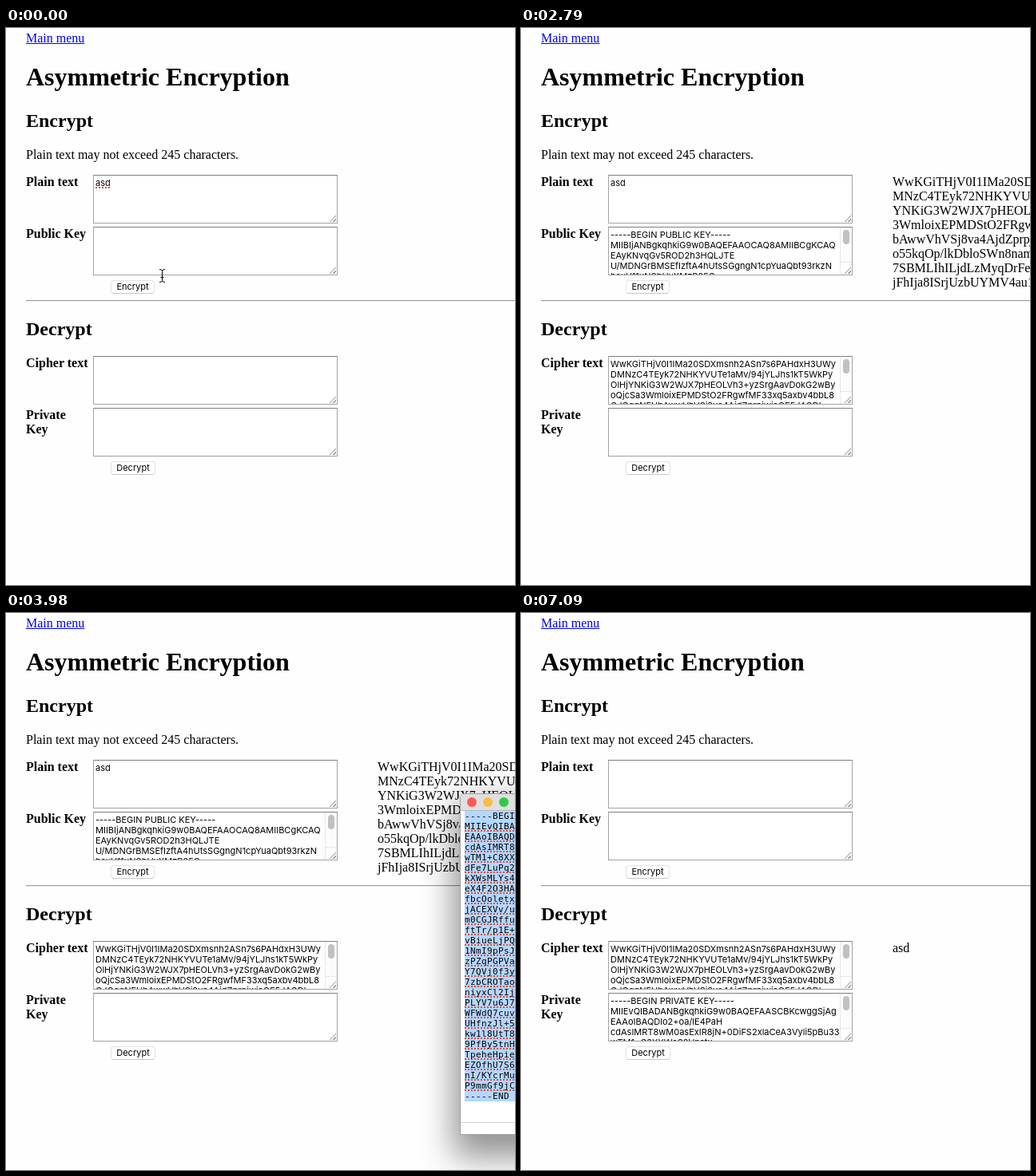
An HTML page for the animation above (7990 ms loop, 637x698 px).

```html
<!DOCTYPE html>
<html lang="en">
<head>
<meta charset="utf-8">
<title>Asymmetric Encryption</title>
<style>
html, body { margin: 0; width: 100%; height: 100%; overflow: hidden; background: #fefefe; }
#stage { position: relative; width: 637px; height: 698px; overflow: hidden; color: #000; font: 16px/18px "Liberation Serif", serif; }
#stage * { box-sizing: border-box; }
#stage > *, .field > *, .icon, .window > * { position: absolute; margin: 0; white-space: pre; }
[hidden] { display: none !important; }
#stage > h1, #stage > h2, #stage > p, #stage > b, #stage > a { left: 25px; }
h1 { font-size: 32px; line-height: 36px; }
h2 { font-size: 24px; line-height: 27px; }
a { color: #00e; text-decoration: underline; }
hr { left: 25px; top: 341px; width: 700px; height: 2px; border: 0; border-top: 1px solid #9a9a9a; border-bottom: 1px solid #eee; }
pre { font: inherit; }
.out { left: 465px; }

.field { left: 109px; width: 306px; height: 61px; border: 1px solid #a3a3a3; border-top-color: #7f7f7f; background: #fff; font: 11px/13px Inter, sans-serif; }
.field pre { left: 0; top: 0; width: 100%; height: 59px; padding: 3px 2px 0; overflow: hidden; }
.field pre.end { padding-top: 6px; }
.field pre.end span { position: relative; top: -13px; }
.field::after { content: ""; position: absolute; right: 1px; bottom: 1px; width: 8px; height: 8px;
  background: linear-gradient(135deg, #0000 49%, #909090 49% 56%, #0000 56% 75%, #909090 75% 82%, #0000 82%); }
.ring { inset: -2px; border: 2px solid #5b9fe8; border-radius: 2px; box-shadow: 0 0 1px 1px #a9cff6; }
.bar { right: 0; top: 0; width: 15px; height: 59px; border-left: 1px solid #e6e6e6; background: #fcfcfc; }
.bar::before { content: ""; position: absolute; left: 3px; top: 3px; width: 8px; height: 18px; border-radius: 4px; background: #c1c1c1; }
.bar.low::before { top: 27px; }
.bar::after { content: ""; position: absolute; left: 0; bottom: 0; width: 14px; height: 15px; border-top: 1px solid #e6e6e6; background: #fff; }
.caret { width: 1px; height: 13px; background: #000; }
.misspelt { text-decoration: underline dotted #e8453c 2px; text-underline-offset: 1px; text-decoration-skip-ink: none; }
.button { left: 131px; width: 55px; height: 17px; border: 1px solid #e2e2e2; border-bottom-color: #c8c8c8; border-radius: 4px; background: #fff; font: 11px/15px Inter, sans-serif; text-align: center; }
.button.down { border-color: #2f7de0; background: #4a95f2; color: #fff; }

.window { left: 568px; top: 226px; width: 500px; height: 428px; border: 1px solid #a0a0a0; border-radius: 6px 6px 0 0; background: #fff; box-shadow: 0 20px 40px 8px rgba(0, 0, 0, .42); }
.title { inset: 0 0 auto; height: 21px; border-bottom: 1px solid #b8b8b8; border-radius: 5px 5px 0 0; background: #e0dfe0; }
.light { top: 4px; width: 12px; height: 12px; border-radius: 50%; }
.key { left: 5px; top: 21px; width: 480px; background: #b3d7ff; font: 11px/13px "DejaVu Sans Mono", monospace; letter-spacing: .38px; }
.foot { left: 0; top: 411px; width: 100%; border-top: 1px solid #d0d0d0; }

.switcher { left: 0; top: 237px; width: 637px; height: 144px; background: #919191; }
.switcher.fading { background: rgba(145, 145, 145, .53); }
.fading .icon { opacity: .85; }
.round { border-radius: 50%; }
.pick { width: 94px; height: 94px; top: 25px; border-radius: 7px; background: #7c7c7c; }
.label { top: 124px; width: 94px; text-align: center; color: #fff; font: 14px/18px Inter, sans-serif; }
.badge { left: 603px; top: 30px; width: 32px; height: 32px; border-radius: 50%; background: #fc3f3a; color: #fff; text-align: center; font: 17px/32px Inter, sans-serif; }
</style>
</head>
<body>
<div id="stage">
  <a style="top:4px">Main menu</a>
  <h1 style="top:43px">Asymmetric Encryption</h1>
  <h2 style="top:103px">Encrypt</h2>
  <p style="top:150px">Plain text may not exceed 245 characters.</p>

  <b style="top:184px">Plain text</b>
  <div class="field" style="top:184px">
    <pre data-on="0-1760"><span class="misspelt">asd</span></pre>
    <pre data-on="1760-6050">asd</pre>
  </div>
  <b style="top:249px">Public Key</b>
  <div class="field" style="top:249px">
    <pre class="end" data-on="440-1760"><span>Zt4mNqW7cLhVb2sKxRj9yGfUo3
HdT6pEaQvM1nXk5wBz8rCgYiJl0SuPq4eVd7oKm
Rb2xNf9LsTjW
8wIDAQAB
-----END PUBLIC KEY-----</span></pre>
    <pre data-on="1760-6050">-----BEGIN PUBLIC KEY-----
MIIBIjANBgkqhkiG9w0BAQEFAAOCAQ8AMIIBCgKCAQ
EAyKNvqGv5ROD2h3HQLJTE
U/MDNGrBMSEfIzftA4hUtsSGgngN1cpYuaQbt93rkzN
hcuV11uNSbUvXMzB25G</pre>
    <i class="bar low" data-on="440-1760"></i>
    <i class="bar" data-on="1760-6050"></i>
    <i class="ring" data-on="290-1760"></i>
    <i class="caret" style="left:2px;top:2px" data-on="290-440"></i>
    <i class="caret" style="left:143px;top:44px" data-on="440-1030"></i>
  </div>
  <div class="button" style="top:316px" data-on="0-1620 1760-7990">Encrypt</div>
  <div class="button down" style="top:316px" data-on="1620-1760">Encrypt</div>
  <pre class="out" style="top:184px" data-on="1760-6050">WwKGiTHjV0I1IMa20SDXms
MNzC4TEyk72NHKYVUTe1a
YNKiG3W2WJX7pHEOLVh3
3WmloixEPMDStO2FRgwfM
bAwwVhVSj8va4AjdZprpjw
o55kqOp/lkDbloSWn8namE
7SBMLIhILjdLzMyqDrFeQs
jFhIja8ISrjUzbUYMV4au1Kd</pre>
  <hr>

  <h2 style="top:364px">Decrypt</h2>
  <b style="top:411px">Cipher text</b>
  <div class="field" style="top:411px">
    <pre data-on="1760-7990">WwKGiTHjV0I1IMa20SDXmsnh2ASn7s6PAHdxH3UWy
DMNzC4TEyk72NHKYVUTe1aMv/94jYLJhs1kT5WkPy
OlHjYNKiG3W2WJX7pHEOLVh3+yzSrgAavDokG2wBy
oQjcSa3WmloixEPMDStO2FRgwfMF33xq5axbv4bbL8
GJGggNFUhAwwVhVSj8va4AjdZprpjwjaQE5JAGDl</pre>
    <i class="bar" data-on="1760-7990"></i>
  </div>
  <b style="top:476px">Private
Key</b>
  <div class="field" style="top:476px">
    <pre class="end" data-on="5310-6050"><span>YfPOX4sSWHjXVBtYxTnfbSIfr
nI/KYcrMuGSlkc8G/nZOQrj1UnEnZdZgi9mNKkUulL28
ckqcRLkMXbygC2Jsgf/X
P9mmGf9jCR0eqK9u3bnlSOM=
-----END PRIVATE KEY-----</span></pre>
    <pre data-on="6050-7990">-----BEGIN PRIVATE KEY-----
MIIEvQIBADANBgkqhkiG9w0BAQEFAASCBKcwggSjAg
EAAoIBAQDlo2+oa/lE4PaH
cdAsIMRT8wM0asExIR8jN+0DiFS2xlaCeA3Vyli5pBu33
wTM1+C8XXWoS8Vnatx</pre>
    <i class="bar low" data-on="5310-6050"></i>
    <i class="bar" data-on="6050-7990"></i>
    <i class="ring" data-on="5160-6050"></i>
    <i class="caret" style="left:2px;top:2px" data-on="5160-5310"></i>
    <i class="caret" style="left:149px;top:44px" data-on="5310-5900"></i>
  </div>
  <div class="button" style="top:543px;width:56px" data-on="0-5900 6050-7990">Decrypt</div>
  <div class="button down" style="top:543px;width:56px" data-on="5900-6050">Decrypt</div>
  <div class="out" style="top:411px" data-on="6050-7990">asd</div>

  <div class="window" data-on="3830-4730">
    <i class="title"></i>
    <i class="light" style="left:8px;background:#fc5b57"></i>
    <i class="light" style="left:28px;background:#fdbc40"></i>
    <i class="light" style="left:48px;background:#34c84a"></i>
    <pre class="key">-----BEGIN PRIVATE KEY-----
<span class="misspelt">MIIEvQIBADANB
EAAoIBAQDlo2+
cdAsIMRT8wM0a
wTM1+C8XXWoS8
dFe7LuPq2xGhN
kXWsMLYs4vRbT
eX4F2O3HAm9Uc
fbcOoletxW6iK
jACEXVv/uZ0pD
m0CGJRffuS3hY
ftTr/p1E+kM8q
vBiueLjPQ5nXo
1NmI9pPsJf2Rw
zPZqPGPVaT7gL
Y7QVj0f3yH4cB
7zbCROTaoU1eK
niyxCl2IjN6sZ
PLYV7u6J7d9Wm
WFWdQ7cuvA3xG
UHfnzJl+5r8Pt
kw1l8UtT8D0vQ
9PfBy5tnHo2Ei
TpeheHpieM5jX
EZOfhU7S6y4Fa
nI/KYcrMuGSlk
P9mmGf9jCR0eq</span>
-----END PRIVATE KEY-----</pre>
    <i class="foot"></i>
  </div>

  <div class="switcher" data-on="3240-3980">
    <i class="icon pick" style="left:91px" data-on="3240-3690"></i>
    <i class="icon pick" style="left:183px" data-on="3690-3830"></i>
    <i class="icon round" style="left:8px;top:33px;width:78px;height:78px;background:#dc4c3f"></i>
    <i class="icon" style="left:107px;top:37px;width:62px;height:62px;background:#fff"></i>
    <i class="icon" style="left:196px;top:36px;width:68px;height:68px;background:#f3f3f3"></i>
    <i class="icon round" style="left:282px;top:34px;width:76px;height:76px;background:#5db98a"></i>
    <i class="icon" style="left:376px;top:37px;width:70px;height:70px;background:#242424"></i>
    <i class="icon" style="left:467px;top:37px;width:70px;height:70px;background:#2b9df4"></i>
    <i class="icon" style="left:562px;top:40px;width:68px;height:68px;background:#5b97d6"></i>
    <span class="icon badge">13</span>
    <span class="icon label" style="left:91px" data-on="3240-3690">LICEcap</span>
    <span class="icon label" style="left:182px" data-on="3690-3980">PageLoam</span>
  </div>

  <svg id="arrow" width="16" height="22" viewBox="-1 -1 16 22"><path d="M0 0V16L3.7 12.6 6.2 18.4 8.8 17.3 6.3 11.6H11.5Z" stroke="#fff"/></svg>
  <svg id="beam" width="9" height="17" viewBox="-4.5 -8.5 9 17" fill="none" stroke="#000"><path d="M-3.5-8Q0-8 0-6V6Q0 8-3.5 8M3.5-8Q0-8 0-6M0 6Q0 8 3.5 8M-2 2H2"/></svg>
</div>
<script>
const LOOP = 7990;
const HIDDEN = null;

// Pointer stops: time, shape, x, y (arrow tip or beam centre).
const stops = [
  [0, 'beam', 195.5, 310.5], [140, 'beam', 193.5, 292.5], [290, 'beam', 190.5, 285.5], [440, HIDDEN],
  [1470, 'arrow', 152, 319], [1620, 'arrow', 160, 317], [1760, 'arrow', 165, 316],
  [1910, 'arrow', 168, 323], [2060, 'arrow', 176, 372], [2200, 'beam', 190.5, 438.5],
  [2350, 'beam', 202.5, 484.5], [2500, 'beam', 206.5, 497.5], [2640, 'arrow', 524, 398], [2790, HIDDEN],
  [4870, 'arrow', 345, 512], [5020, 'arrow', 286, 527], [5160, 'beam', 262.5, 515.5], [5310, HIDDEN],
  [5600, 'arrow', 152, 540], [5750, 'arrow', 141, 544], [6200, 'arrow', 170, 551],
  [6350, 'arrow', 290, 573], [6500, 'arrow', 420, 598], [6650, 'arrow', 540, 617],
  [6800, 'arrow', 604, 626], [6950, 'arrow', 609, 678], [7090, HIDDEN]
];

const byId = id => document.getElementById(id);
const switcher = document.querySelector('.switcher');
const shapes = { arrow: [byId('arrow'), 1, 1], beam: [byId('beam'), 4.5, 8.5] };
const timed = [...document.querySelectorAll('[data-on]')].map(el => ({
  el, spans: el.dataset.on.split(' ').map(span => span.split('-').map(Number))
}));

function drawPointer(t) {
  const [, shape, x, y] = stops.findLast(([start]) => start <= t);
  for (const [name, [el, dx, dy]] of Object.entries(shapes)) {
    el.toggleAttribute('hidden', name !== shape);
    if (name === shape) el.style.transform = `translate(${x - dx}px, ${y - dy}px)`;
  }
}

function draw(now) {
  const t = now % LOOP;
  for (const { el, spans } of timed) el.hidden = !spans.some(([from, to]) => t >= from && t < to);
  switcher.classList.toggle('fading', t >= 3830);
  drawPointer(t);
}

let start;
function tick(now) {
  start ??= now;
  draw(now - start);
  requestAnimationFrame(tick);
}
draw(0);
requestAnimationFrame(tick);
</script>
</body>
</html>
```
